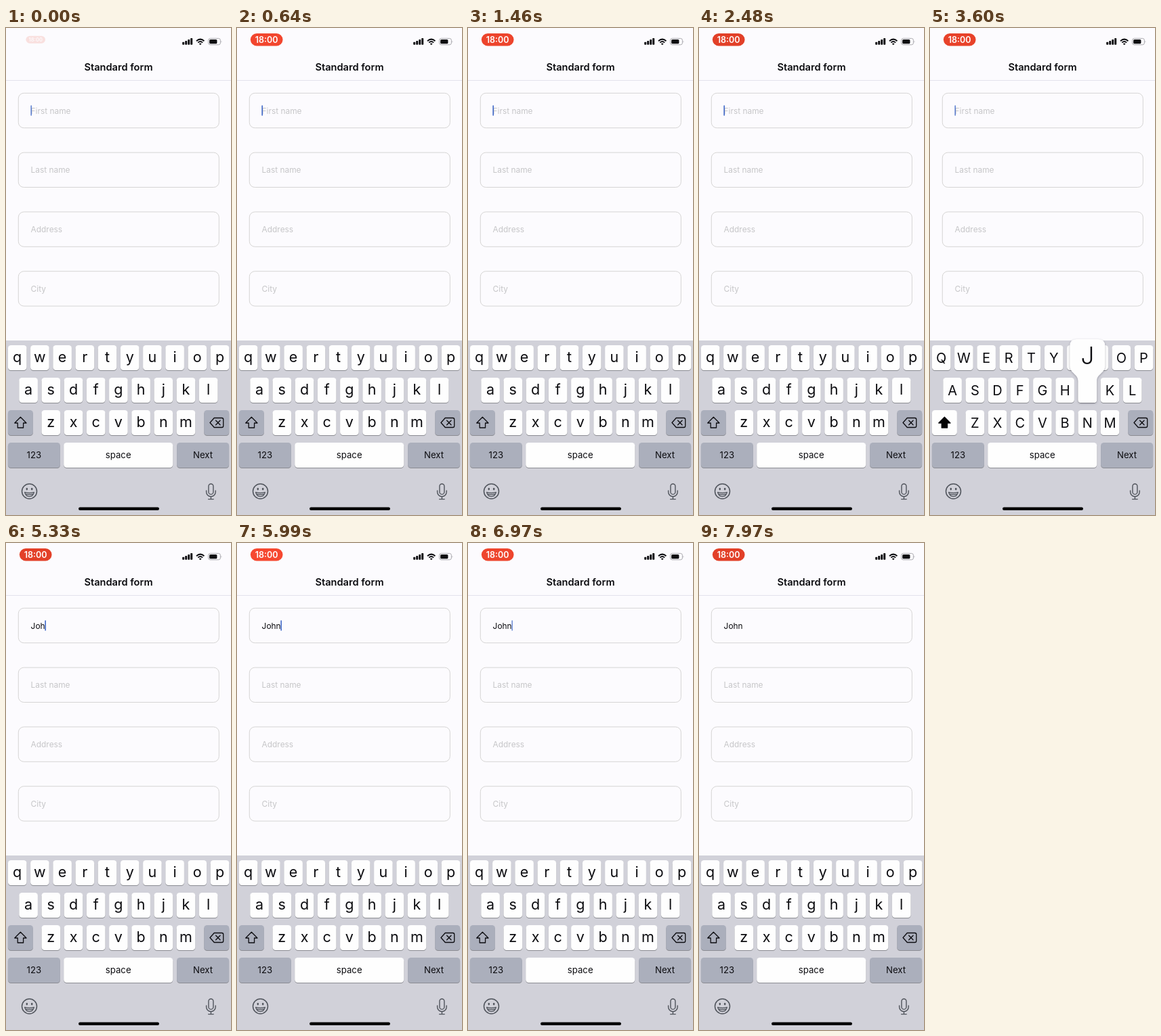
Animation, 332 px wide and 720 px high, one loop 7990 ms. Source, as an HTML page:

```html
<!DOCTYPE html>
<html lang="en">
<head>
<meta charset="utf-8">
<title>Form typing</title>
<style>
  html, body { margin: 0; width: 100%; height: 100%; overflow: hidden; background: #fcfbfe; }
  svg { display: block; width: 332px; height: 720px; font-family: Inter, Roboto, sans-serif; }
</style>
</head>
<body>
<svg id="stage" viewBox="0 0 332 720"></svg>
<script>
const LOOP = 7990;
const PAGE = '#fcfbfe', INK = '#0c0c10', KEY = '#fefefe', GREY = '#abafbc';
const ICON = '#50545c', BORDER = '#d6d5d4';
const stage = document.getElementById('stage');

function el(name, attrs, parent = stage, text) {
  const node = document.createElementNS('http://www.w3.org/2000/svg', name);
  for (const k in attrs) node.setAttribute(k, attrs[k]);
  if (text !== undefined) node.textContent = text;
  parent.appendChild(node);
  return node;
}
const rect = (x, y, width, height, rx, fill, more) =>
  el('rect', { x, y, width, height, rx, fill, ...more });
const label = (text, x, y, size, more, parent) =>
  el('text', { x, y, 'font-size': size, fill: INK, ...more }, parent, text);
const line = (d, width, more) =>
  el('path', { d, fill: 'none', stroke: INK, 'stroke-width': width, 'stroke-linejoin': 'round', 'stroke-linecap': 'round', ...more });
const centered = { 'text-anchor': 'middle' };
const show = (node, on) => node.setAttribute('visibility', on ? 'visible' : 'hidden');

// Page and status bar
rect(0, 0, 332, 720, 0, PAGE);
const clock = el('g', {});
const pill = el('rect', { x: -23.8, y: -9.2, width: 47.6, height: 18.4, rx: 9.2 }, clock);
label('18:00', 0, 4.5, 12.5, { ...centered, fill: '#fff', 'font-weight': 600 }, clock);
for (let i = 0; i < 4; i++) {
  const h = 4 + i * 1.9;
  rect(260.2 + i * 4, 24.8 - h, 3, h, 0.8, INK);
}
line('M281 19.2 Q286.7 14 292.4 19.2', 2, { 'stroke-linecap': 'butt' });
line('M283.3 21.6 Q286.7 18.6 290.1 21.6', 1.9, { 'stroke-linecap': 'butt' });
el('path', { d: 'M284.8 23.2 Q286.7 21.8 288.6 23.2 L286.7 25.2Z', fill: INK });
rect(298.6, 15.4, 17.8, 9.4, 2.8, 'none', { stroke: '#a2a2a6', 'stroke-width': 0.9 });
rect(300.1, 16.9, 11.3, 6.4, 1.5, INK);
el('path', { d: 'M317.6 18.4 q1.6 1.7 0 3.4Z', fill: '#a2a2a6' });

// Header and form
label('Standard form', 166, 63.4, 14.6, { ...centered, 'font-weight': 600 });
rect(0, 77, 332, 1, 0, '#e3e2ec');
const fields = ['First name', 'Last name', 'Address', 'City'].map((name, i) => {
  const y = 96.3 + i * 87.8;
  rect(18.3, y, 296, 51.4, 8, PAGE, { stroke: BORDER, 'stroke-width': 1 });
  return label(name, 36.6, y + 30.2, 11.9, { fill: '#c6c6c8' });
});
const typed = label('', 36.6, 126.5, 11.9);
const caret = rect(36.4, 114.2, 1.6, 15.6, 0.8, '#3f68c8');

// Keyboard
rect(0, 462, 332, 258, 0, '#d1d1d9');
function keyBox(x, y, w, fill) {
  rect(x, y + 1.1, w, 37, 4.5, '#8b8c92');
  return rect(x, y, w, 37, 4.5, fill);
}
const letters = {};
[['qwertyuiop', 2.9], ['asdfghjkl', 19.3], ['zxcvbnm', 52.5]].forEach(([row, left], r) => {
  [...row].forEach((ch, i) => {
    const x = left + i * 33.2, y = 469 + r * 48;
    keyBox(x, y, 27.6, KEY);
    letters[ch] = { x: x + 13.8, y, node: label(ch, x + 13.8, y + 25, 21.5, centered) };
  });
});
const shiftBox = keyBox(2.9, 565, 37, GREY);
const arrow = line('M21.4 575.2 L30 584 H25.6 V591 H17.2 V584 H12.8Z', 1.3);
keyBox(292.2, 565, 37, GREY);
line('M307.2 576.5 H318.5 Q320.7 576.5 320.7 578.7 V588.3 Q320.7 590.5 318.5 590.5 H307.2 L301 583.5Z', 1.3);
line('M309.6 580.3 L316 586.7 M316 580.3 L309.6 586.7', 1.3);
[['123', 2.9, 77, GREY], ['space', 85.2, 161, KEY], ['Next', 252.1, 77, GREY]].forEach(([s, x, w, fill]) => {
  keyBox(x, 613, w, fill);
  label(s, x + w / 2, 636.2, 13.2, centered);
});

// Emoji, microphone, home bar
const drawn = { stroke: ICON };
el('circle', { cx: 34.5, cy: 685, r: 11, fill: 'none', stroke: ICON, 'stroke-width': 1.5 });
for (const x of [30.8, 38.2]) el('ellipse', { cx: x, cy: 681.6, rx: 1.3, ry: 1.8, fill: ICON });
line('M27.6 686.4 Q34.5 688.6 41.4 686.4 Q40 692.6 34.5 692.6 Q29 692.6 27.6 686.4Z M29.4 689.2 Q34.5 690.6 39.6 689.2', 1.3, drawn);
rect(298.9, 674, 7, 15.4, 3.5, 'none', { stroke: ICON, 'stroke-width': 1.4 });
line('M295.6 684 V686 A6.8 6.8 0 0 0 309.2 686 V684 M302.4 692.8 V696.6 M298.6 696.6 H306.2', 1.4, drawn);
rect(107, 708.6, 119, 4.4, 2.2, '#050505');

// Key balloon, drawn around the key's top centre
const balloon = el('g', { style: 'filter:drop-shadow(0 1px 1.5px rgba(70,70,85,.4))' });
el('path', {
  d: 'M-16 -57 H16 Q26 -57 26 -47 V-18 C26 -6 13.8 -6 13.8 5 V33 Q13.8 37 9.8 37 H-9.8 Q-13.8 37 -13.8 33 V5 C-13.8 -6 -26 -6 -26 -18 V-47 Q-26 -57 -16 -57Z',
  fill: KEY
}, balloon);
const glyph = label('', 0, -20, 35, { ...centered, 'font-weight': 300 }, balloon);

const SHIFT_ON = 2960;
const LINGER = 85;
const strokes = [
  { ch: 'J', down: 3480, up: 3640 },
  { ch: 'o', down: 4520, up: 4640 },
  { ch: 'h', down: 5000, up: 5150 },
  { ch: 'n', down: 5560, up: 5700 }
];
const BLINK = 900, FIRST_BLINK = 540;
const clamp = v => Math.max(0, Math.min(1, v));

function caretAlpha(t, since) {
  const u = (((t - since) / BLINK) % 1 + 1) % 1;
  if (u < 0.5) return clamp((0.5 - u) / 0.12);
  return clamp((u - 0.92) / 0.08);
}

function pillColor(t) {
  const k = 0.5 - 0.5 * Math.cos((t - 2480) / 1372 * 2 * Math.PI);
  const mix = (a, b) => Math.round(a + (b - a) * k);
  return `rgb(${mix(226, 247)},${mix(64, 72)},${mix(40, 48)})`;
}

let wasUpper;
function setCase(upper) {
  if (upper === wasUpper) return;
  wasUpper = upper;
  for (const ch in letters) {
    const { y, node } = letters[ch];
    node.textContent = upper ? ch.toUpperCase() : ch;
    node.setAttribute('font-size', upper ? 20 : 21.5);
    node.setAttribute('y', y + (upper ? 26 : 25));
  }
  shiftBox.setAttribute('fill', upper ? KEY : GREY);
  arrow.setAttribute('fill', upper ? '#050505' : 'none');
}

function draw(t) {
  // The clock pill pops in at the start
  const pop = 1 - (1 - clamp((t - 20) / 220)) ** 3;
  clock.setAttribute('transform', `translate(43.7 17.2) scale(${0.6 + 0.4 * pop})`);
  clock.setAttribute('opacity', 0.14 + 0.86 * pop);
  pill.setAttribute('fill', pillColor(t));

  setCase(t >= SHIFT_ON && t < strokes[0].up);

  const done = strokes.filter(s => t >= s.up);
  typed.textContent = done.map(s => s.ch).join('');
  show(fields[0], !done.length);
  const width = done.length ? typed.getComputedTextLength() : 0;
  caret.setAttribute('x', 36.4 + width);
  caret.setAttribute('opacity', caretAlpha(t, done.length ? done[done.length - 1].up : FIRST_BLINK));

  const press = strokes.find(s => t >= s.down && t < s.up + LINGER);
  show(balloon, !!press);
  if (press) {
    const key = letters[press.ch.toLowerCase()];
    balloon.setAttribute('transform', `translate(${key.x} ${key.y})`);
    glyph.textContent = press.ch;
  }
}

const start = performance.now();
function tick() {
  draw((performance.now() - start) % LOOP);
  requestAnimationFrame(tick);
}
tick();
</script>
</body>
</html>
```
